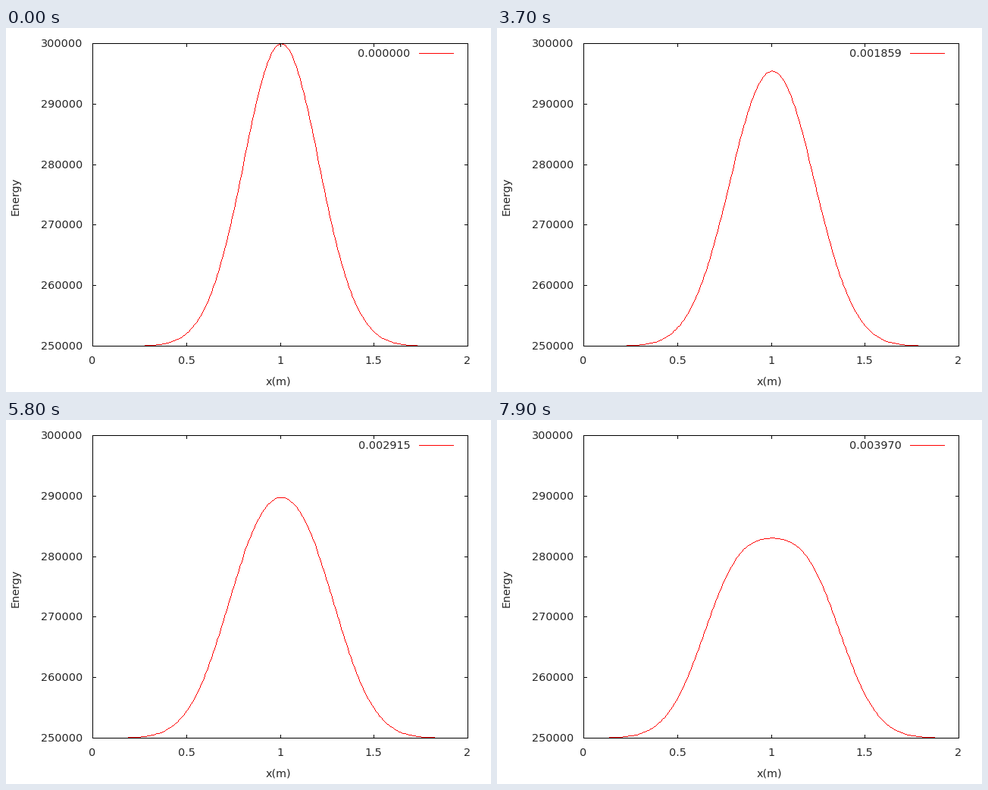
Animation, 640 px wide and 480 px high, one loop 8000 ms. Source, as a matplotlib script:

```python
import numpy as np
import matplotlib.pyplot as plt
from matplotlib.animation import FuncAnimation

W, H, DPI = 640, 480, 100
FRAMES, INTERVAL = 80, 100
LEFT, RIGHT, TOP, BOTTOM = 114, 609, 20, 419
PX = 72 / DPI  # one pixel in points
INK, RED = "#262626", "#ff0000"

# Gas at rest with a Gaussian pressure bump
N, GAMMA, RHO0 = 200, 1.4, 75
E0, BUMP, SIGMA = 250000, 50000, 0.2
x = np.linspace(0, 2, N)
dx = x[1] - x[0]
dt = dx / 200


def flux(q):
    rho, mom, energy = q
    u = mom / rho
    p = (GAMMA - 1) * (energy - 0.5 * mom * u)
    return np.array([mom, mom * u + p, u * (energy + p)])


def step(q):
    """One two-step Lax-Wendroff update of the Euler equations."""
    half = (q[:, 1:] + q[:, :-1]) / 2 - dt / (2 * dx) * np.diff(flux(q))
    new = q.copy()
    new[:, 1:-1] -= dt / dx * np.diff(flux(half))
    return new


def solve():
    bump = np.exp(-(x - x[N // 2]) ** 2 / (2 * SIGMA ** 2))
    q = np.array([np.full(N, RHO0), np.zeros(N), E0 + BUMP * bump])
    out = []
    for _ in range(FRAMES):
        out.append(q[2])
        q = step(q)
    return out


def nearest(v):
    return np.floor(v + 0.5).astype(int)


def to_px(xv, energy):
    px = LEFT + xv / 2 * (RIGHT - LEFT)
    up = (energy - E0) / BUMP * (BOTTOM - TOP)
    return nearest(px), BOTTOM - nearest(up)


def raster(px, py):
    """Crisp one-pixel polyline on a transparent layer."""
    steps = np.maximum(abs(np.diff(px)), abs(np.diff(py)))
    s = np.concatenate([[0], np.cumsum(steps)])
    t = np.arange(s[-1] + 1)
    layer = np.zeros((H, W, 4), np.uint8)
    layer[nearest(np.interp(t, s, py)), nearest(np.interp(t, s, px))] = 255, 0, 0, 255
    return layer


fig = plt.figure(figsize=(W / DPI, H / DPI), dpi=DPI, facecolor="white")
ax = fig.add_axes([0, 0, 1, 1])
ax.axis("off")
curve = ax.imshow(np.zeros((H, W, 4), np.uint8), extent=(0, W, H, 0),
                  interpolation="nearest", aspect="auto", zorder=1)
ax.set(xlim=(0, W), ylim=(H, 0))


def stroke(xs, ys, color="black"):
    # whole numbers snap to the centre of their pixel
    ax.plot(xs, ys, color=color, lw=PX, snap=True, zorder=3,
            solid_capstyle="projecting", solid_joinstyle="miter")


def label(px, py, text, ha="center", **kw):
    return ax.text(px, py, text, ha=ha, va=kw.pop("va", "baseline"),
                   family="DejaVu Sans", size=14.4 * PX, color=INK, **kw)


stroke([LEFT, RIGHT, RIGHT, LEFT, LEFT], [TOP, TOP, BOTTOM, BOTTOM, TOP])

for value in range(250000, 300001, 10000):
    y = to_px(0, value)[1]
    stroke([LEFT, LEFT + 4], [y, y])
    stroke([RIGHT - 4, RIGHT], [y, y])
    label(101.5, y + 5, str(value), ha="right")

for value in (0, 0.5, 1, 1.5, 2):
    px = to_px(value, E0)[0]
    stroke([px, px], [BOTTOM - 4, BOTTOM])
    stroke([px, px], [TOP, TOP + 4])
    label(px, 443, f"{value:g}")

label(359, 471, "x(m)")
label(13, 222, "Energy", va="center", rotation=90)

clock = label(533.5, 38, "", ha="right")
stroke([545, 590], [33, 33], RED)

states = solve()


def draw(i):
    curve.set_data(raster(*to_px(x, states[i])))
    clock.set_text(f"{i * dt:.6f}")
    return curve, clock


anim = FuncAnimation(fig, draw, frames=FRAMES, interval=INTERVAL,
                     repeat=True, repeat_delay=0)
plt.show()
```
